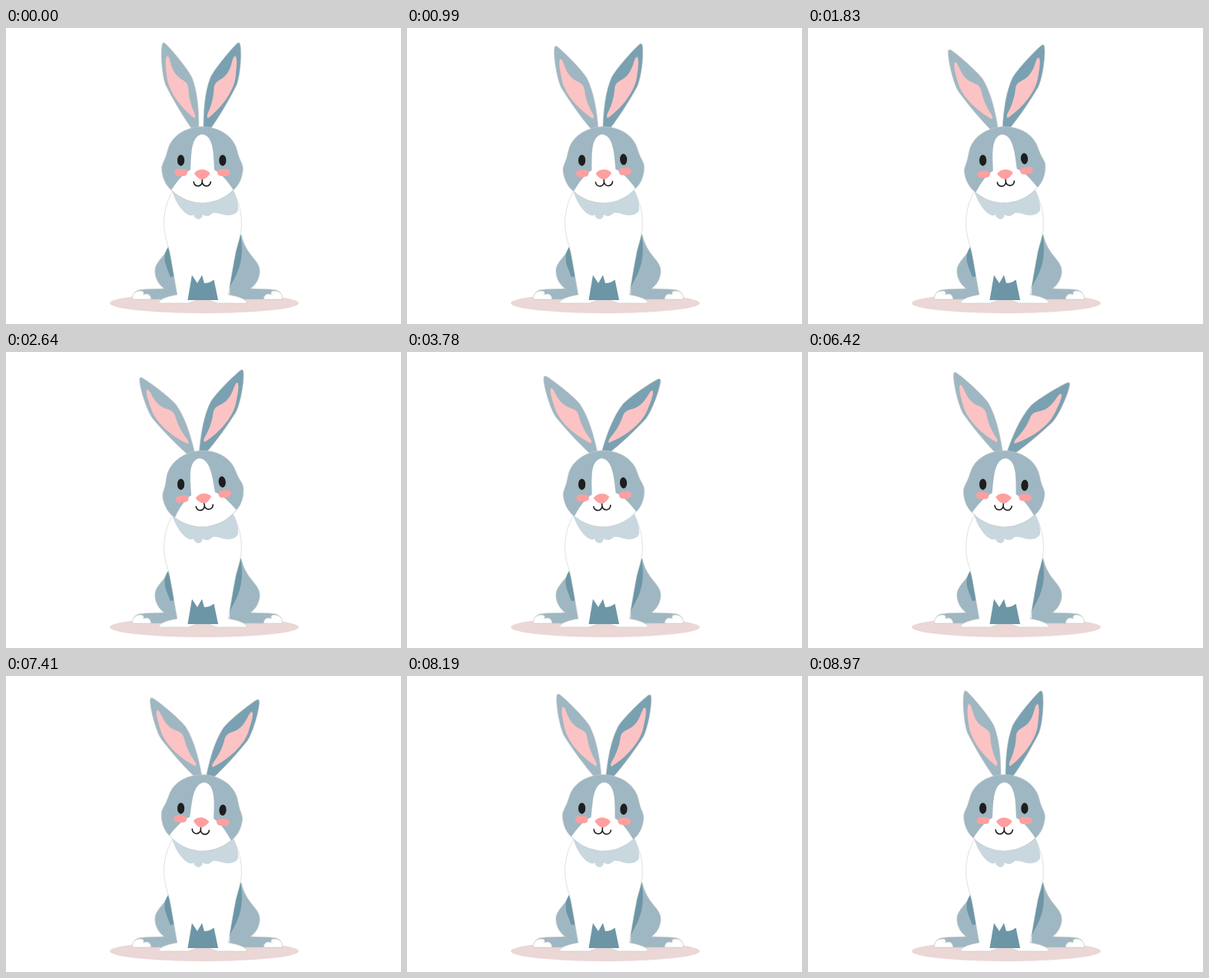
An HTML page that plays this animation: 512x384 px, repeating every 9 s.

```html
<!DOCTYPE html>
<html lang="en">
<head>
<meta charset="utf-8">
<title>Rabbit</title>
<style>
  html, body { margin: 0; width: 100%; height: 100%; overflow: hidden; background: #fff; }
  svg { display: block; width: 100vw; height: 100vh; }
  .fur { fill: #9fb7c2; }
  .shade { fill: #6c96a6; }
  .white { fill: #fff; }
  .line { stroke: #c8cbc9; stroke-width: .6; }
  .blush { fill: #ff9f9f; }
  .eye { fill: #1e1e1e; }
  .pink { fill: #fbc3c3; }
  .mouth { fill: none; stroke: #1e1e1e; stroke-width: 1.6; stroke-linecap: round; }
</style>
</head>
<body>
<!-- groups with data-axis hold a left half that the script mirrors -->
<svg viewBox="0 0 512 384">
  <defs>
    <g id="ear">
      <path class="line" d="M203.500 19.300C200 22 201 58 207 74C215 90 228 113 241 131L250 130C250 110 249 84 241 64C235 52 214 27 207 20.500Q205 18.500 203.500 19.300Z"/>
      <path class="pink" d="M208.500 36.500C206 40 207 50 208.300 62C210 80 224 101 244 117Q246 116 245 112C239 99 237 89 236.500 79C236 68 228 69 221 61C214 53 213.500 43 211 38Q209.700 35.700 208.500 36.500Z"/>
    </g>
  </defs>

  <ellipse cx="257" cy="357" rx="122.500" ry="13" fill="#ebd7d5"/>
  <g data-axis="261">
    <path class="fur line" d="M217 268C211 296 193 300 193 316C193.500 326 199 334 205 338C194 339 182 338 172 340C166 342 163.500 347 164 352H232V290Z"/>
    <path class="white line" d="M164 352C163 345 168 341 174 341Q180 341 178 346C184 343 188 347 188 352Z"/>
  </g>
  <path class="shade" d="M212 282C205 289 204 300 208 310L213 323L222 322Z"/>
  <path class="shade" d="M303 262C308 285 307 305 296 325L288 340Z"/>

  <g data-axis="255">
    <path class="white line" d="M256 210H217C208 224 204.500 240 204.800 256C205 268 209 278 212 290C216 310 219 330 222 346C212 348 200 350 197.500 357H236L256 350"/>
  </g>
  <path class="shade" d="M235.500 353L241 320.500L248 331L254 320.500L257 331Q264 331 269.500 326.500L275 353Z"/>
  <path fill="#c9d7de" d="M215 210C219 225 229 240 238 243Q242 244 243 242Q244 247 249 248Q254 248 255 242Q261 247 268 240C275 239 280 243 288 243Q298 243 301 236C301 226 299 218 294 209Z"/>

  <g id="head">
    <g id="earL"><use href="#ear" fill="#9fb7c2"/></g>
    <g id="earR"><use href="#ear" fill="#7aa1b1" transform="matrix(-1 0 0 1 506 0)"/></g>
    <g data-axis="254.500">
      <path class="fur line" d="M255.500 128C236 128 218 137 211 154C208 163 208 166 204 174Q201 180 202 185C203 196 208 205 214 210C226 221 240 227 255.500 227"/>
    </g>
    <g data-axis="254.500">
      <path class="white" d="M255.500 138C246 138 242 148 240.500 161C239.500 170 239.500 177 239 184C231 188 223 197 214.500 210C226 221 240 226.700 255.500 226.700"/>
      <rect class="blush" x="218.500" y="183" width="16.500" height="9" rx="4.500"/>
    </g>
    <ellipse class="eye" cx="280.800" cy="171.700" rx="4.600" ry="7.200"/>
    <g id="muzzle">
      <path class="mouth" d="M254.300 195V199.500M243.300 199.500a5.500 5.500 0 0 0 11 0a5.500 5.500 0 0 0 11 0"/>
      <path class="blush" d="M244 188.500C249 182 259.500 182 264.500 188.500C262 193 257.500 196.500 254.300 196.500C251 196.500 246.500 193 244 188.500Z"/>
    </g>
  </g>
  <ellipse class="eye" cx="226.700" cy="171.700" rx="4.600" ry="7.200"/>
</svg>

<script>
  const LOOP = 9000;

  // key points in seconds and degrees; every track starts and ends at rest
  const turns = {
    head: { pivot: "254 175", keys: [[2.82, -7.4], [5.07, 0.2], [7.44, 4.6]] },
    earL: { pivot: "246 129", keys: [[2.82, -7], [6.5, -11.6], [7.44, -15.4]] },
    earR: { pivot: "260 129", keys: [[2.8, 13], [3.74, 20.5], [6.53, 16.7], [7.44, 7]] }
  };
  const part = id => document.getElementById(id);

  function valueAt(keys, s) {
    const track = [[0, 0], ...keys, [LOOP / 1000, 0]];
    const i = track.findIndex(key => key[0] > s);
    const [s0, a] = track[i - 1], [s1, b] = track[i];
    return a + (b - a) * (s - s0) / (s1 - s0);
  }

  // one short sideways twitch of the nose and mouth
  const twitch = s => -3.5 * Math.max(0, 1 - Math.abs(s - 3.85));

  function mirror(group) {
    const half = document.createElementNS("http://www.w3.org/2000/svg", "g");
    half.append(...[...group.children].map(child => child.cloneNode(true)));
    half.setAttribute("transform", `matrix(-1 0 0 1 ${2 * group.dataset.axis} 0)`);
    group.append(half);
  }

  function draw(s) {
    for (const [id, { pivot, keys }] of Object.entries(turns)) {
      part(id).setAttribute("transform", `rotate(${valueAt(keys, s)} ${pivot})`);
    }
    part("muzzle").setAttribute("transform", `translate(${twitch(s)} 0)`);
  }

  document.querySelectorAll("[data-axis]").forEach(mirror);
  const start = performance.now();
  function tick() {
    draw((performance.now() - start) % LOOP / 1000);
    requestAnimationFrame(tick);
  }
  tick();
</script>
</body>
</html>
```
